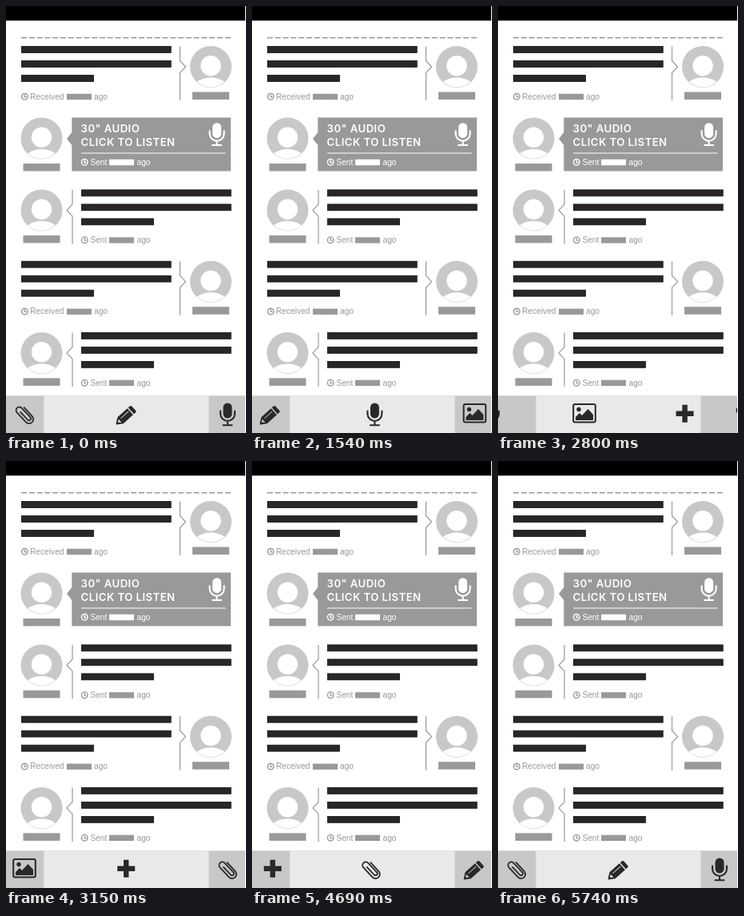
An HTML page that plays this animation: 300x534 px, repeating every 6.37 s.

```html
<!DOCTYPE html>
<html lang="en">
<head>
<meta charset="utf-8">
<title>Message composer</title>
<style>
html, body { margin: 0; width: 100%; height: 100%; overflow: hidden; background: #fff; }
svg { display: block; width: 100%; height: 100%; }
.meta { font: 10.2px "Liberation Sans", Arial, sans-serif; }
.title { font: 600 13.2px Inter, Montserrat, sans-serif; letter-spacing: .45px; fill: #fff; }
.line { fill: none; stroke: #999; stroke-width: 1.2; }
.ink { fill: #2a2829; }
.pen { fill: none; stroke: #2a2829; }
</style>
</head>
<body>
<svg viewBox="0 0 300 534" preserveAspectRatio="none">
  <defs>
    <clipPath id="disc"><circle r="25.5"/></clipPath>
    <clipPath id="page"><rect width="299" height="534"/></clipPath>
    <g id="avatar">
      <circle r="26" fill="#c8c8c8"/>
      <ellipse cy="29" rx="23" ry="15.5" fill="#fff" clip-path="url(#disc)"/>
      <circle cy="-1.2" r="12.7" fill="#fff"/>
      <rect x="-23" y="31.5" width="46" height="9.5" fill="#999"/>
    </g>
    <g id="bars" fill="#292627" stroke="#121111" stroke-width=".8">
      <rect x=".4" y="50.5" width="186.8" height="7.9"/>
      <rect x=".4" y="68.5" width="186.8" height="7.9"/>
      <rect x=".4" y="86.5" width="90" height="7.9"/>
    </g>
    <g id="clock" fill="none" stroke="currentColor" stroke-width="1.4">
      <circle r="3.8"/>
      <path d="M0-2.4V.4H2.2"/>
    </g>
    <g id="sent" class="meta" fill="currentColor">
      <use href="#clock" x="98.2" y="113.3"/>
      <text x="105.4" y="116.8">Sent</text>
      <rect x="129" y="109.8" width="31" height="7.4"/>
      <text x="163.5" y="116.8">ago</text>
    </g>
    <g id="received" color="#999">
      <use href="#bars" x="19"/>
      <g class="meta" fill="currentColor">
        <use href="#clock" x="23.4" y="113.3"/>
        <text x="30" y="116.8">Received</text>
        <rect x="76" y="109.8" width="31" height="7.4"/>
        <text x="110" y="116.8">ago</text>
      </g>
      <path class="line" d="M217.5 50.5V68.5L224.5 76L217.5 83.5V118"/>
      <use href="#avatar" x="256" y="76"/>
    </g>
    <g id="reply" color="#999">
      <use href="#bars" x="94"/>
      <use href="#sent"/>
      <path class="line" d="M83 50.5V68.5L76 76L83 83.5V118"/>
      <use href="#avatar" x="44.5" y="76"/>
    </g>
    <g id="mic">
      <rect x="-5.5" y="-14.5" width="11" height="19" rx="5.5" fill="currentColor"/>
      <path d="M-9-4.5v3.5a9 9 0 0 0 18 0v-3.5M0 8v5M-5.5 13.3h11" fill="none" stroke="currentColor" stroke-width="2.1" stroke-linecap="round"/>
    </g>
  </defs>

  <rect width="300" height="534" fill="#fff"/>
  <g clip-path="url(#page)">
    <rect width="300" height="18.3"/>
    <path d="M19 39.8H281.5" stroke="#999" stroke-width="1.5" stroke-dasharray="7 2.8"/>

    <use href="#received"/>
    <use href="#avatar" x="44.5" y="165.5"/>
    <path d="M82.3 139.4H281V206.6H82.3V174L76 166L82.3 158Z" fill="#999"/>
    <text class="title" x="93.6" y="158.2">30" AUDIO</text>
    <text class="title" x="93.6" y="175.4">CLICK TO LISTEN</text>
    <path d="M94 184H274.5" stroke="#fff"/>
    <g color="#fff">
      <use href="#sent" y="82"/>
      <use href="#mic" transform="translate(263.6 160.7)"/>
    </g>
    <use href="#reply" y="179.4"/>
    <use href="#received" y="268.7"/>
    <use href="#reply" y="357.9"/>

    <rect y="487.3" width="300" height="47" fill="#c8c8c8"/>
    <rect x="47.3" y="487.3" width="206.2" height="47" fill="#e9e9e9"/>

    <g id="clipIcon">
      <path class="pen" stroke-width="1.8" stroke-linecap="round" transform="rotate(-43)"
        d="M5.4-7V7.8a5.4 5.4 0 0 1-10.8 0V-8.6a4.1 4.1 0 0 1 8.2 0V7.2a2.3 2.3 0 0 1-4.6 0V-6"/>
    </g>
    <g id="pencilIcon">
      <path class="ink" fill-rule="evenodd" transform="translate(0 1.3) rotate(-42)"
        d="M-16-.5L-9-5.4H7.5V5.4H-9L-16 .5ZM-13-.2L-9.6 2.8V-2.8ZM-7-2.1V-1.2H6V-2.1ZM8.9-5.4H11.5a2 2 0 0 1 2 2V3.4a2 2 0 0 1-2 2H8.9Z"/>
    </g>
    <g id="micIcon" color="#2a2829"><use href="#mic"/></g>
    <g id="imageIcon">
      <rect class="pen" x="-13.8" y="-13" width="27.6" height="22.6" rx="2" stroke-width="2"/>
      <circle class="ink" cx="-7" cy="-6.5" r="2.7"/>
      <path class="ink" d="M-11 7V3L-6-2L-3 1L4.5-7L11 0V7Z"/>
    </g>
    <g id="plusIcon">
      <path class="pen" stroke-width="6.4" d="M-11-1.2H11M0-12.2V9.8"/>
    </g>
  </g>
</svg>
<script>
const LOOP = 6370, TICK = 70, FIRST = 490, PERIOD = 1050;
const LEAD = 43, SLIDE = 580, ENTER = 325, EXIT = -70;

// resting x in the right, centre and left slots
const icons = [
  ["clipIcon", 277.3, 149.3, 23.5],
  ["pencilIcon", 277, 149.7, 22],
  ["micIcon", 277, 153.6, 23],
  ["imageIcon", 278.6, 150.2, 23],
  ["plusIcon", 275, 150.2, 26]
].map(([id, ...slots]) => ({
  node: document.getElementById(id),
  stops: [ENTER, ...slots, EXIT]
}));

const ease = u => u < 0.5 ? 4 * u ** 3 : 1 - 4 * (1 - u) ** 3;

function travel(t) {
  if (t < FIRST) return 0;
  const step = Math.floor((t - FIRST) / PERIOD);
  if (step >= icons.length) return icons.length;
  const local = (t - FIRST) % PERIOD;
  return step + ease(Math.min(1, (local + LEAD) / SLIDE));
}

function draw(now) {
  const t = Math.floor((now % LOOP) / TICK) * TICK;
  const shift = travel(t);
  icons.forEach(({ node, stops }, n) => {
    const q = (shift + 3 - n + 5) % 5;
    const i = Math.floor(q);
    const x = i < 4 ? stops[i] + (stops[i + 1] - stops[i]) * (q - i) : EXIT;
    node.setAttribute("transform", `translate(${x.toFixed(2)} 511)`);
  });
}

const start = performance.now();
function frame() {
  draw(performance.now() - start);
  requestAnimationFrame(frame);
}
frame();
</script>
</body>
</html>
```
